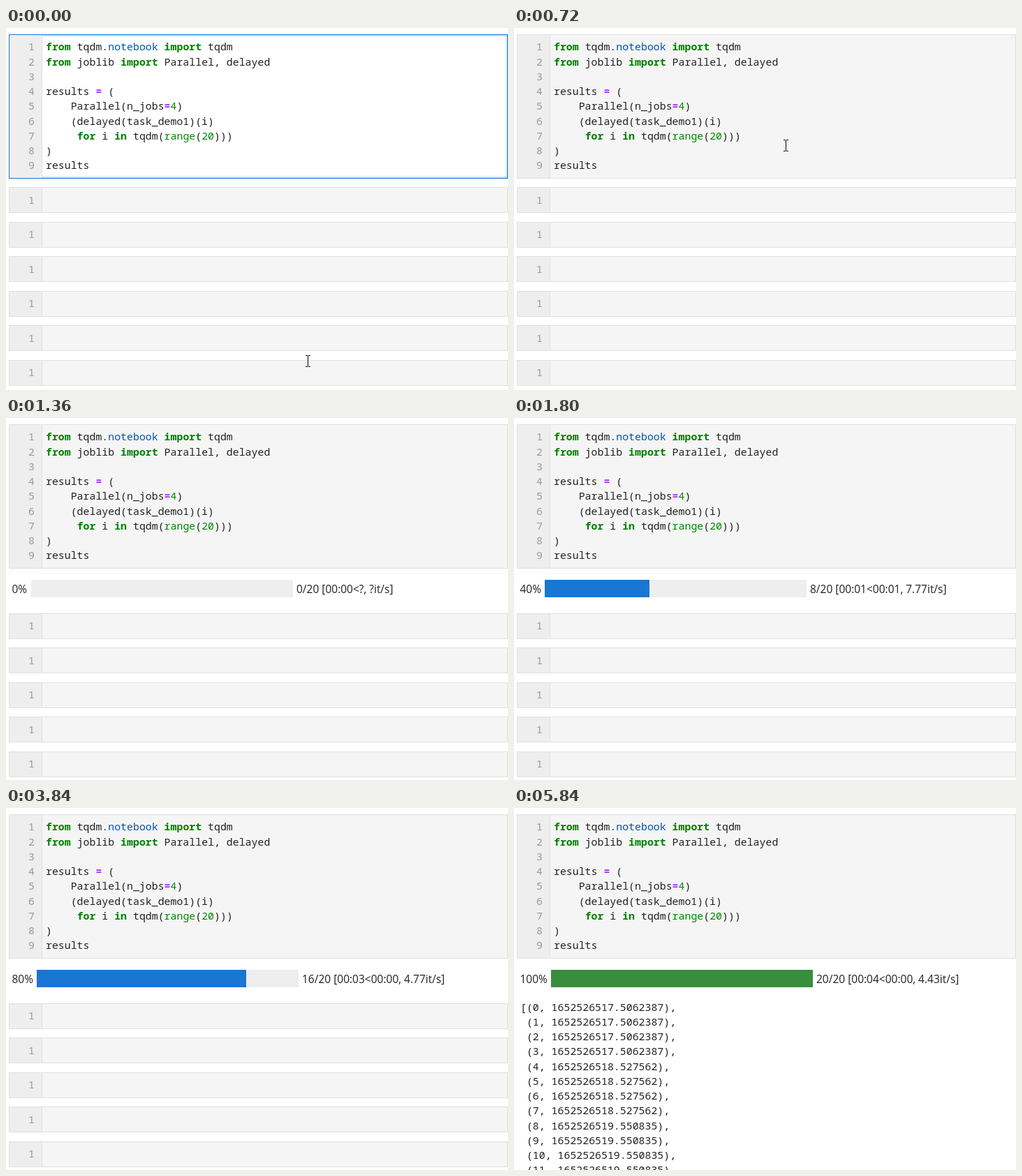
Recreate the animation shown at these times as an HTML page. Size 719x519 px, loop 6960 ms.

```html
<!DOCTYPE html>
<html lang="en">
<head>
<meta charset="utf-8">
<title>Parallel progress in a notebook</title>
<style>
html, body { margin: 0; width: 100%; height: 100%; overflow: hidden; background: #fff; }
#stage { position: relative; width: 719px; height: 519px; overflow: hidden; color: #212121; }
#stage div, #stage pre, #cursor { position: absolute; box-sizing: border-box; margin: 0; }
pre { font: 14.88px/21.25px "Noto Sans Mono", "DejaVu Sans Mono", monospace; white-space: pre; }
.cell { left: 4px; width: 715px; height: 37px; border: 1px solid #e0e0e0; background: #f5f5f5; }
.gutter { left: 0; top: 0; bottom: 0; width: 47px; background: #eee; border-right: 1px solid #e0e0e0; }
.gutter pre { top: 6.5px; right: 10px; color: #999; text-align: right; }
#main { top: 9px; height: 207px; }
#main > pre { left: 52px; top: 6.25px; }
#main .gutter pre { top: 6.25px; }
#main.active { background: #fff; border-color: #1976d2; box-shadow: inset 0 0 4px #64b5f6; }
b { color: #008000; }
b.op { color: #a2f; }
.prop { color: #05a; }
.num { color: #080; }
.matched .bracket { color: #0b0; }
.matched .close { box-shadow: 1px 0 #000; }
#progress { left: 0; top: 232px; width: 719px; height: 25px; font: 15.5px/25px "Open Sans", "Noto Sans", sans-serif; white-space: pre; }
#percent, #stats { top: 1px; }
#percent { left: 8.5px; }
#track { width: 375px; height: 25px; background: #eee; }
#fill { left: 0; top: 0; height: 25px; }
#output { left: 9px; top: 274.5px; }
</style>
</head>
<body>
<div id="stage">
  <div id="main" class="cell"><div class="gutter"><pre>1
2
3
4
5
6
7
8
9</pre></div><pre><b>from</b> tqdm.<span class="prop">notebook</span> <b>import</b> tqdm
<b>from</b> joblib <b>import</b> Parallel, delayed

results <b class="op">=</b> <span class="bracket">(</span>
    Parallel(n_jobs<b class="op">=</b><span class="num">4</span>)
    (delayed(task_demo1)(i)
     <b>for</b> i <b>in</b> tqdm(<span class="num">range</span>(<span class="num">20</span>)))
<span class="bracket close">)</span>
results</pre></div>
  <div id="progress"><div id="percent"></div><div id="track"><div id="fill"></div></div><div id="stats"></div></div>
  <pre id="output"></pre>
  <svg id="cursor" width="7" height="17" fill="none" stroke="#000"><path d="M0 .5H3M4 .5H7M3.5 1V16M0 16.5H3M4 16.5H7"/></svg>
</div>
<script>
const LOOP = 6960, RUN = 720, SHOW = 760, DONE = 4800, RESULT = 5840;
const $ = id => document.getElementById(id);

// bar time, text time, finished tasks, timing
const updates = [
  [SHOW, 800, 0, '00:00<?, ?it/s'],
  [1800, 1800, 8, '00:01<00:01, 7.77it/s'],
  [2800, 2840, 12, '00:02<00:01, 5.48it/s'],
  [3800, 3840, 16, '00:03<00:00, 4.77it/s'],
  [DONE, DONE, 20, '00:04<00:00, 4.43it/s']
];

const cells = Array.from({ length: 6 }, () => {
  const cell = document.createElement('div');
  cell.className = 'cell';
  cell.innerHTML = '<div class="gutter"><pre>1</pre></div>';
  $('stage').insertBefore(cell, $('progress'));
  return cell;
});

const stamps = ['17.5062387', '18.527562', '19.550835'];
$('output').textContent = Array.from({ length: 12 }, (_, i) =>
  `${i ? ' ' : '['}(${i}, 16525265${stamps[i >> 2]}),`).join('\n');

const show = (el, on) => el.style.display = on ? '' : 'none';

function drawCells(t) {
  const shifted = t >= SHOW;
  cells.forEach((cell, i) => {
    show(cell, t < RESULT && !(shifted && i === 5));
    cell.style.top = (shifted ? 279.6 : 228.1) + 49.5 * i + 'px';
  });
  $('main').classList.toggle('active', t < RUN);
  $('main').classList.toggle('matched', t >= 360 && t < RUN);
  show($('output'), t >= RESULT);
}

function drawProgress(t) {
  show($('progress'), t >= SHOW);
  const bar = updates.findLast(u => t >= u[0]) || updates[0];
  const text = updates.findLast(u => t >= u[1]);
  const label = `${(text ? text[2] : 0) * 5}%`;
  const x = Math.floor(36 + 8.5 * (label.length - 2));
  $('percent').textContent = text ? label : '';
  $('track').style.left = x + 'px';
  $('fill').style.width = bar[2] * 5 + '%';
  $('fill').style.background = t >= DONE ? '#388e3c' : '#1976d2';
  $('stats').style.left = x + 380 + 'px';
  $('stats').textContent = text ? `${text[2]}/20 [${text[3]}]` : '';
}

function drawCursor(t) {
  const p = Math.min(1, Math.floor(t / 40) / 6);
  const k = p * p * (3 - 2 * p);
  const [x, y] = t >= 1320 ? [612, 189] : [429 - 43 * k, 469 - 309 * k];
  show($('cursor'), t < 1360);
  $('cursor').style.left = Math.round(x) + 'px';
  $('cursor').style.top = Math.round(y) + 'px';
}

const start = performance.now();
function frame() {
  const t = (performance.now() - start) % LOOP;
  drawCells(t);
  drawProgress(t);
  drawCursor(t);
  requestAnimationFrame(frame);
}
frame();
</script>
</body>
</html>
```
